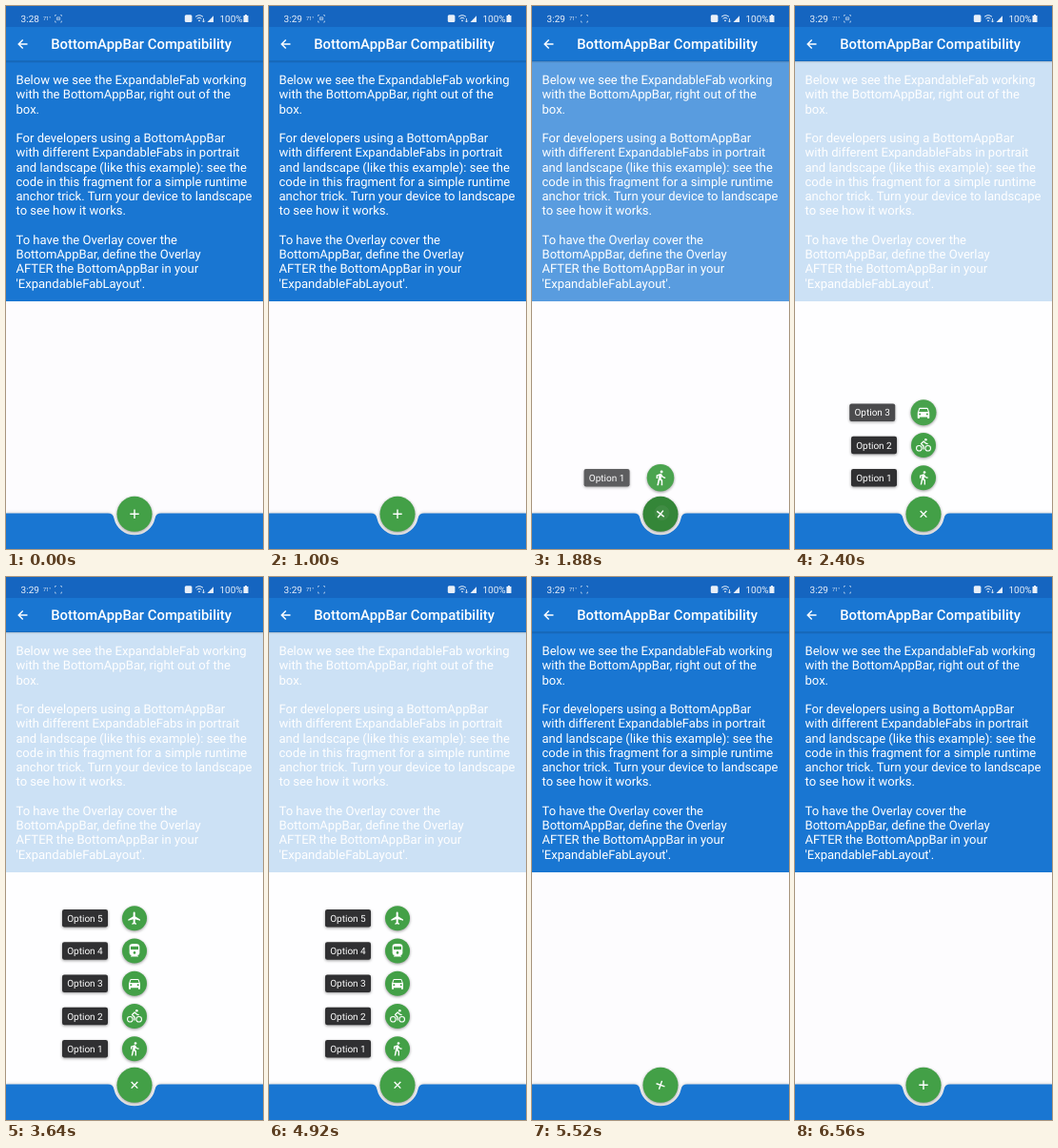
Recreate the animation shown at these times as an HTML page. Size 270 by 570 pixels, loop 6600 ms.

```html
<!DOCTYPE html>
<html lang="en">
<head>
<meta charset="utf-8">
<title>BottomAppBar Compatibility</title>
<style>
  html, body { margin: 0; width: 100%; height: 100%; overflow: hidden; background: #fdfcfe; }
  svg { display: block; width: 100vw; height: 100vh; font: 13.06px Roboto, sans-serif; fill: #fff; text-rendering: geometricPrecision; }
  .lift { filter: drop-shadow(0 1.5px 1.5px rgba(0, 0, 0, .4)); }
  .bar { filter: drop-shadow(0 -.5px 1.5px rgba(0, 0, 0, .14)); }
  .line { fill: none; stroke: #fff; }
  .small { font-size: 10px; }
</style>
</head>
<body>
<svg viewBox="0 0 270 570">
  <defs>
    <linearGradient id="shade" x2="0" y2="1">
      <stop stop-color="#000" stop-opacity=".2"/>
      <stop offset="1" stop-color="#000" stop-opacity="0"/>
    </linearGradient>
  </defs>

  <rect width="270" height="570" fill="#fdfcfe"/>
  <rect y="58" width="270" height="252" fill="#1976d2"/>
  <g id="copy"></g>
  <rect id="overlay" y="58" width="270" height="475"/>

  <rect width="270" height="58" fill="#1976d2"/>
  <rect y="57.5" width="270" height="2.5" fill="url(#shade)"/>
  <path class="line" stroke-width="1.4" d="M22.5 40H13.5M17.7 35.5L13.2 40L17.7 44.5"/>
  <text x="47.2" y="45" font-size="14.87" font-weight="500">BottomAppBar Compatibility</text>

  <rect width="270" height="22" fill="#1565c0"/>
  <g opacity=".9">
    <text id="clock" class="small" x="15.6" y="16.6"></text>
    <text x="39" y="15" font-size="5.5">71°</text>
    <g class="line" stroke-width=".7" opacity=".8">
      <path d="M51.5 11V9.5H53M57 9.5H58.5V11M58.5 15.5V17H57M53 17H51.5V15.5"/>
      <path id="scan" d="M53.4 11.8H56.7V14.7H53.4ZM53.4 13.2H56.7"/>
    </g>
    <rect x="187.8" y="9.3" width="7.6" height="7.6" rx="1.5"/>
    <path class="line" stroke-width="1" d="M199 11.3Q203 8.2 207 11.3M200.6 13.2Q203 11.2 205.4 13.2"/>
    <circle cx="203" cy="15.3" r=".9"/>
    <path class="line" stroke-width=".8" d="M207.5 13V17M206.2 15.5L207.5 17L208.8 15.5"/>
    <path d="M211.5 17H218V10.2Z"/>
    <text class="small" x="224.5" y="16.6">100%</text>
    <path d="M249.5 10H251V9H253V10H254.5V17H249.5Z"/>
  </g>

  <path class="bar" fill="#1976d2" d="M0 532.6H107Q112.5 532.6 113.5 538A22 22 0 0 0 156.5 538Q157.5 532.6 163 532.6H270V570H0Z"/>
  <g id="options"></g>
  <circle id="fab" class="lift" cx="135" cy="533.3" r="18.5"/>
  <path id="plus" class="line" stroke-width="1.4" d="M-4.7 0H4.7M0 -4.7V4.7"/>
  <circle id="touch" r="7.5" fill="#fff" fill-opacity=".35" stroke="#999" stroke-width=".8"/>
</svg>

<script>
const LOOP = 6600;
const OPEN = 1680, OPEN_STEP = 250, DIM_TIME = 560;
const CLOSE = 5084, CLOSE_STEP = 75, SPIN_BACK = 500;
const LABEL_SHIFT = 44;
const GREEN = '#43a047';

const $ = id => document.getElementById(id);
const ramp = (t, start, length) => Math.min(1, Math.max(0, (t - start) / length));
const overshoot = (v, tension) => (v - 1) ** 2 * ((tension + 1) * (v - 1) + tension) + 1;
const anticipate = (v, tension) => v * v * ((tension + 1) * v - tension);

const copy = [
  'Below we see the ExpandableFab working', 'with the BottomAppBar, right out of the', 'box.', '',
  'For developers using a BottomAppBar', 'with different ExpandableFabs in portrait',
  'and landscape (like this example): see the', 'code in this fragment for a simple runtime',
  'anchor trick. Turn your device to landscape', 'to see how it works.', '',
  'To have the Overlay cover the', 'BottomAppBar, define the Overlay',
  'AFTER the BottomAppBar in your', "'ExpandableFabLayout'."
];
$('copy').innerHTML = copy.map((line, i) =>
  `<text x="10.5" y="${82 + i * 15.26}">${line}</text>`).join('');

// Icons on a 24-unit grid: walk, bike, car, train, plane
const icons = [
  `<circle cx="13.5" cy="3.5" r="2"/>
   <path d="M9.8 8.9L7 23H9.1L10.9 15L13 17V23H15V15.5L12.9 13.5L13.5 10.5C14.8 12 16.8 13 19 13V11
     C17.1 11 15.5 10 14.7 8.6L13.7 7Q13 6 12 6L6 8.3V13H8V9.6Z"/>`,
  `<circle cx="15.5" cy="3.5" r="2"/>
   <g class="line" stroke-width="1.6"><circle cx="5" cy="17" r="4.2"/><circle cx="19" cy="17" r="4.2"/></g>
   <path class="line" stroke-width="2" stroke-linejoin="round" d="M12 19V13.5L8.3 9.8L12.2 6L14.6 8.4Q16.5 10 19 10"/>`,
  `<path d="M3 12L5.1 6Q5.5 5 6.5 5H17.5Q18.5 5 18.9 6L21 12V20Q21 21 20 21H18V19H6V21H4Q3 21 3 20Z"/>
   <g fill="${GREEN}"><path d="M5 11L6.5 6.5H17.5L19 11Z"/>
   <circle cx="6.5" cy="14.5" r="1.5"/><circle cx="17.5" cy="14.5" r="1.5"/></g>`,
  `<path d="M4 5C4 1.5 7.6 1 12 1S20 1.5 20 5V15.5Q20 19 16.5 19L18 20.5V21H6V20.5L7.5 19Q4 19 4 15.5Z"/>
   <g fill="${GREEN}"><path d="M6 5H18V10H6Z"/><circle cx="12" cy="15" r="2"/></g>`,
  `<path d="M21 16V14L13 9V3.5A1.5 1.5 0 0 0 10 3.5V9L2 14V16L10 13.5V19L8 20.5V22L11.5 21L15 22V20.5L13 19V13.5Z"/>`
];
$('options').innerHTML = icons.map((icon, i) => `
  <g transform="translate(135 ${495.2 - i * 34.25})">
    <g><g class="lift"><circle r="13" fill="${GREEN}"/></g>
      <g transform="scale(.667) translate(-12 -12)">${icon}</g></g>
    <g><rect class="lift" x="-76" y="-9.3" width="48" height="18.6" rx="2.2" fill="#303032"/>
      <text class="small" x="-70.8" y="3.6">Option ${i + 1}</text></g>
  </g>`).join('');
const options = [...$('options').children].map(group => group.children);

function drawOption([button, label], index, t) {
  const shown = ramp(t, OPEN + index * OPEN_STEP, OPEN_STEP);
  const hidden = ramp(t, CLOSE + (icons.length - 1 - index) * CLOSE_STEP, CLOSE_STEP);
  const size = hidden ? 1 - hidden : overshoot(shown, 3.5);
  const alpha = hidden ? 1 - hidden : shown ** 1.15;
  button.setAttribute('transform', `scale(${Math.max(0, size)})`);
  button.setAttribute('opacity', alpha ** .2);
  label.setAttribute('transform', `translate(${(1 - size) * LABEL_SHIFT} 0)`);
  label.setAttribute('opacity', alpha);
}

function drawTouch(t) {
  const second = t > 4000;
  const [x, y, down, up] = second ? [88, 358, 4930, 5084] : [136.5, 532, 1590, 1680];
  const alpha = ramp(t, down, 40) * (1 - ramp(t, up, second ? 260 : 240));
  $('touch').setAttribute('transform', `translate(${x} ${y})`);
  $('touch').setAttribute('opacity', alpha);
}

function draw(t) {
  $('clock').textContent = t < 800 ? '3:28' : '3:29';
  $('scan').setAttribute('opacity', (t + 568) % 1008 < 504 ? 0 : 1);

  const dim = ramp(t, OPEN, DIM_TIME) - ramp(t, CLOSE, CLOSE_STEP * icons.length);
  $('overlay').setAttribute('opacity', dim * .78);
  options.forEach((parts, i) => drawOption(parts, i, t));

  const press = ramp(t, 1600, 90) - ramp(t, 1800, 300);
  const shade = [67, 160, 71].map((c, i) => c + press * ([46, 125, 50][i] - c));
  $('fab').setAttribute('fill', `rgb(${shade.map(Math.round)})`);

  const turn = overshoot(ramp(t, OPEN, 250), 2) - anticipate(ramp(t, CLOSE, SPIN_BACK), 2);
  $('plus').setAttribute('transform', `translate(135 533.3) rotate(${-135 * turn})`);
  drawTouch(t);
}

function tick() {
  draw(performance.now() % LOOP);
  requestAnimationFrame(tick);
}
tick();
</script>
</body>
</html>
```
